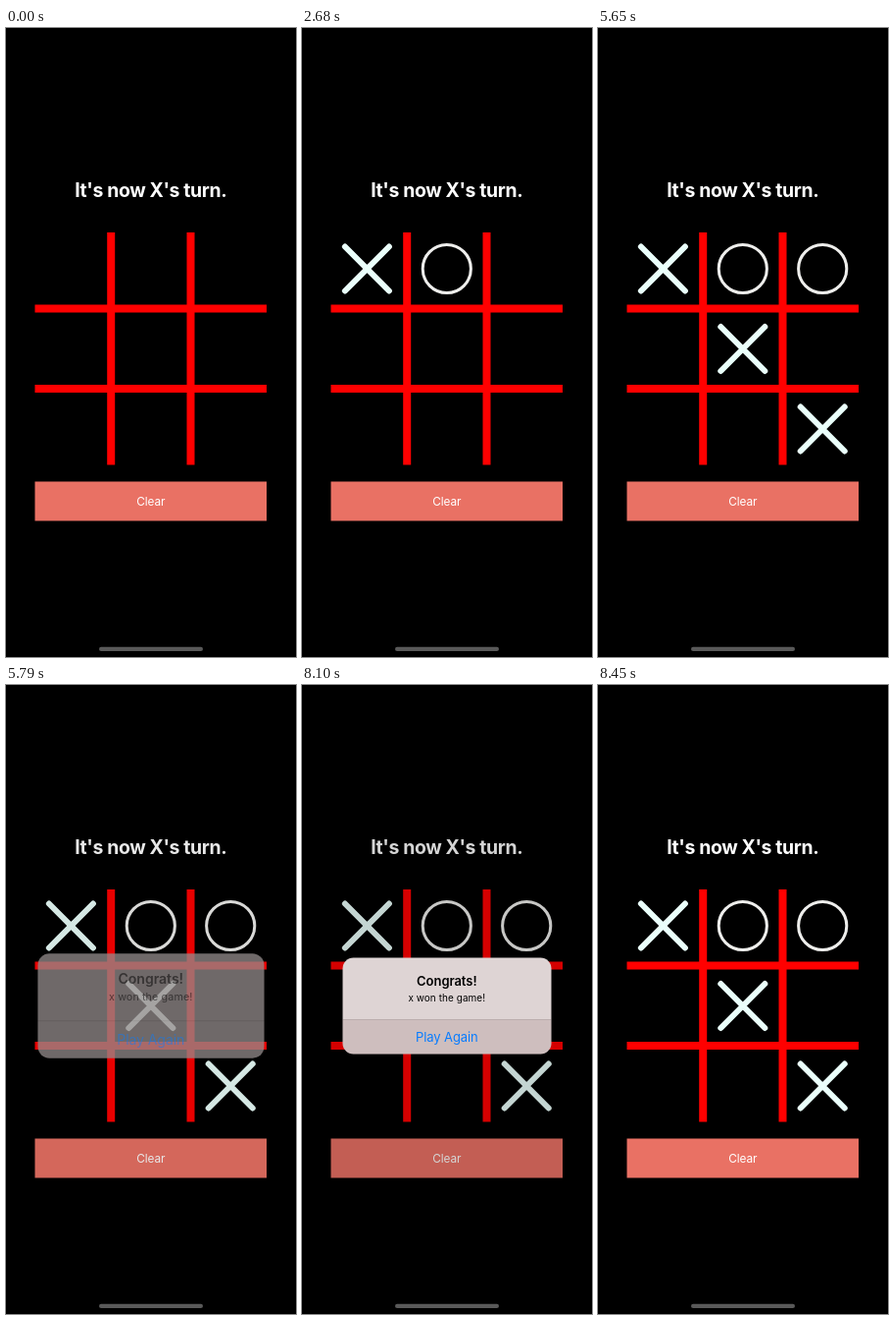
Animation, 296 px wide and 640 px high, one loop 8.66 s. Source, as an HTML page:

```html
<!DOCTYPE html>
<html lang="en">
<head>
<meta charset="utf-8">
<title>Tic-tac-toe</title>
<style>
  html, body { margin: 0; width: 100%; height: 100%; overflow: hidden; background: #000; }
  svg { display: block; width: 100%; height: 100%; }
  text { font-family: Inter, "Liberation Sans", sans-serif; text-anchor: middle; }
  .turn { font-size: 19.4px; font-weight: 700; letter-spacing: -.35px; fill: #fff; }
  .clear { font-size: 11.8px; letter-spacing: -.1px; fill: #fff; }
  .head { font-size: 13px; font-weight: 600; letter-spacing: -.05px; }
  .note { font-size: 9.95px; letter-spacing: .08px; }
  .again { font-size: 13px; letter-spacing: -.1px; fill: #087cff; }
  .x { stroke: #eafffb; stroke-width: 6; stroke-linecap: round; }
  .o { fill: none; stroke: #eeeeec; stroke-width: 3; }
</style>
</head>
<body>
<svg viewBox="0 0 296 640">
  <defs>
    <path id="x" class="x" d="M-22.5-22.5 22.5 22.5M22.5-22.5-22.5 22.5"/>
    <circle id="o" class="o" r="24.6"/>
    <clipPath id="round"><rect x="41.5" y="277.5" width="213" height="98" rx="11"/></clipPath>
  </defs>
  <rect width="296" height="640"/>
  <text id="turn" class="turn" x="147.8" y="171.5"></text>
  <path stroke="#f00" stroke-width="8" d="M107.2 208V444.5M188.5 208V444.5M29.5 285.6H266M29.5 367H266"/>
  <g id="marks"></g>
  <rect x="29.5" y="461.5" width="236.5" height="40" fill="#e97164"/>
  <text class="clear" x="147.8" y="486">Clear</text>
  <rect id="dim" width="296" height="640"/>
  <g id="alert">
    <g id="panel" clip-path="url(#round)">
      <rect id="fill" x="41" y="277" width="214" height="99"/>
      <rect id="press" x="41" y="340.5" width="214" height="36" fill="#703c3c" opacity=".15"/>
      <path d="M41 340.5H255" stroke="#504040" stroke-opacity=".25" stroke-width=".8"/>
    </g>
    <g id="words">
      <text class="head" x="147.8" y="305.8">Congrats!</text>
      <text class="note" x="147.8" y="321.6">x won the game!</text>
      <text class="again" x="147.8" y="363">Play Again</text>
    </g>
  </g>
  <rect x="95" y="629.8" width="106" height="4.2" rx="2.1" fill="#595959"/>
</svg>
<script>
const LOOP = 8660;
const $ = id => document.getElementById(id);

// Each move: time, mark, column, row, next player
const moves = [
  [1070, 'x', 0, 0, 'O'],
  [2680, 'o', 1, 0, 'X'],
  [3460, 'x', 1, 1, 'O'],
  [4610, 'o', 2, 0, 'X'],
  [5650, 'x', 2, 2, 'X']
];

// Alert steps: time, scale, visibility, dimming
const steps = [
  [0, 1, 0, 0],
  [5790, 1.085, .5, .09],
  [5920, 1.022, .87, .14],
  [6030, 1.004, .98, .16],
  [6140, 1, 1, .165],
  [8220, 1, .5, .08],
  [8330, 1, .12, .02],
  [8450, 1, 0, 0]
];

$('marks').innerHTML = moves.map(([, mark, col, row]) =>
  `<use href="#${mark}" x="${66.4 + 81.4 * col}" y="${245 + 81.5 * row}"/>`).join('');
const marks = [...$('marks').children];

const latest = (list, t) => list.filter(item => item[0] <= t).pop();
const show = (el, on) => el.setAttribute('visibility', on ? 'inherit' : 'hidden');

function draw(t) {
  const move = latest(moves, t);
  const turn = `It's now ${move ? move[4] : 'X'}'s turn.`;
  if ($('turn').textContent !== turn) $('turn').textContent = turn;
  marks.forEach((el, i) => show(el, t >= moves[i][0]));

  const [, scale, seen, dim] = latest(steps, t);
  $('dim').setAttribute('opacity', dim);
  show($('alert'), seen > 0);
  $('alert').setAttribute('transform',
    `translate(148 326.5) scale(${scale}) translate(-148 -326.5)`);
  // The frosted panel covers the board sooner than it brightens
  const cover = 1 - (1 - seen) ** 2;
  const light = seen / (cover || 1);
  $('panel').setAttribute('opacity', cover);
  $('fill').setAttribute('fill', `rgb(${[222, 212, 212].map(c => Math.round(c * light))})`);
  $('words').setAttribute('opacity', seen);
  show($('press'), t >= 8100);
}

function tick() {
  draw(performance.now() % LOOP);
  requestAnimationFrame(tick);
}
tick();
</script>
</body>
</html>
```
